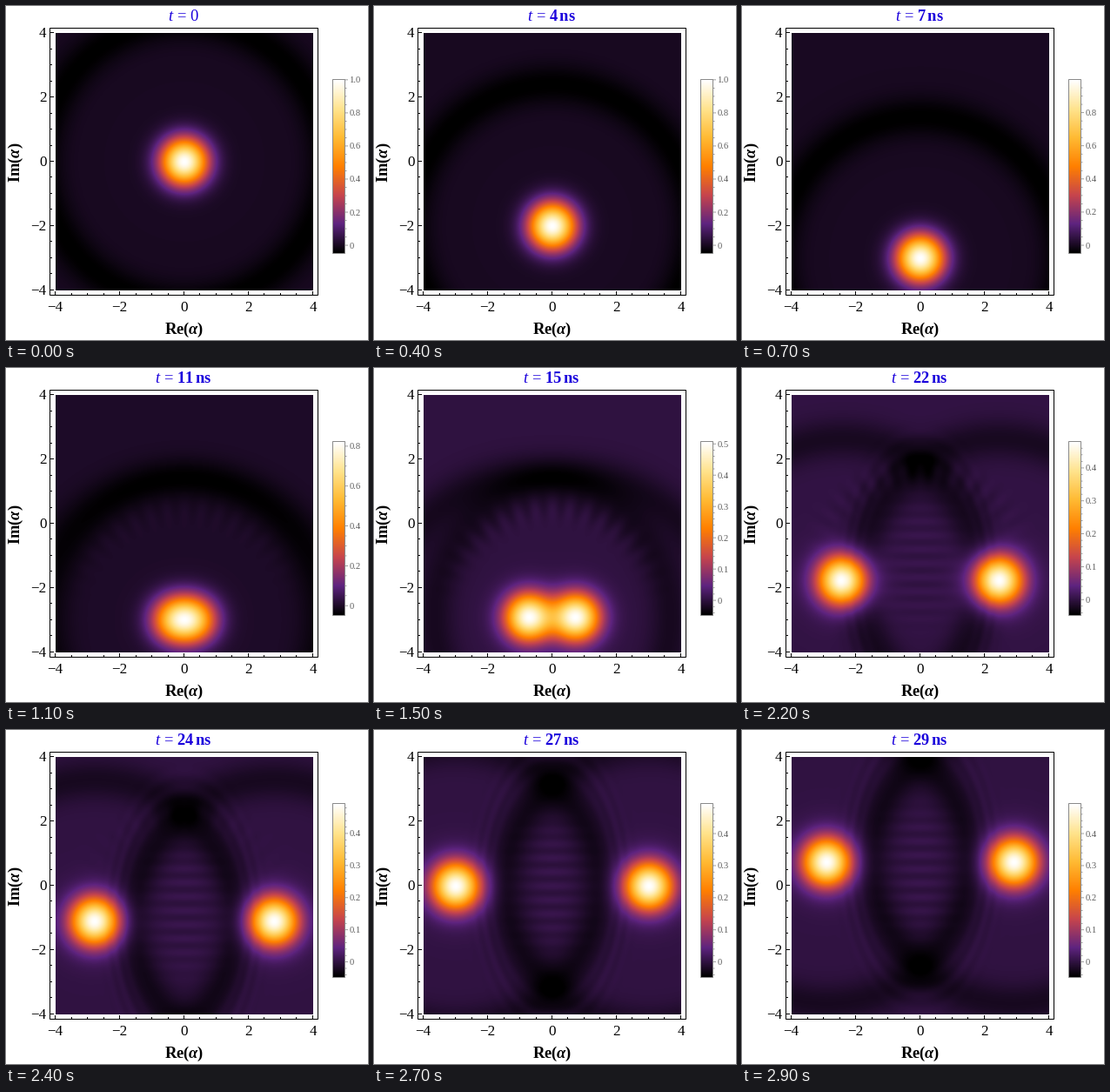
A matplotlib script that plays this animation: 416 px wide and 384 px high, repeating every 3000 ms.

```python
import numpy as np
import matplotlib.pyplot as plt
from matplotlib.animation import FuncAnimation
from matplotlib.colors import LinearSegmentedColormap
from matplotlib.patches import Rectangle

W, H, DPI = 416, 384, 64
PT = 72 / DPI                      # points per pixel
FRAMES, INTERVAL = 30, 100
LEFT, RIGHT, TOP, BOTTOM = 57, 353, 31, 327
BAR_L, BAR_R, BAR_T, BAR_B = 376, 389, 85, 284
VMIN = -0.047
BLUE, GREY = "#1a00dc", "#5a5a5a"

plt.rcParams.update({
    "font.family": "Liberation Serif",
    "mathtext.fontset": "custom",
    "mathtext.rm": "Liberation Serif",
    "mathtext.it": "Liberation Serif:italic",
    "mathtext.bf": "Liberation Serif:bold",
    "mathtext.bfit": "Liberation Serif:italic:bold",
})

SUNSET = LinearSegmentedColormap.from_list("sunset", [
    (0, 0, 0), (0.37, 0.14, 0.50), (0.78, 0.27, 0.30), (1, 0.5, 0),
    (1, 0.73, 0.20), (1, 0.89, 0.55), (1, 1, 1)], N=512)

N = RIGHT - LEFT
axis = (np.arange(N) + 0.5) / N * 8 - 4
X, Y = np.meshgrid(axis, -axis)


def smooth(a, b, t):
    u = np.clip((t - a) / (b - a), 0, 1)
    return u * u * (3 - 2 * u)


def split_angle(t):
    """Half angle between the two branches: the rate ramps up, then holds."""
    if t <= 6:
        return 0.0
    start, end, rate = 8, 20.88, 7.15
    if t < end:
        turn = rate * max(t - start, 0) ** 2 / (2 * (end - start))
    else:
        turn = rate * (t - (start + end) / 2)
    return np.radians(turn + 3.5 * np.exp(-((t - 11) / 3) ** 2))


def branch(cx, cy, spread):
    """Gaussian peak with a shallow negative ring around it."""
    r = np.hypot(X - cx, Y - cy)
    peak = (1 - 0.07 * spread) * np.exp(-2 * r**2)
    halo = 0.055 * spread * np.exp(-0.8 * r**2)
    ring = -0.048 * np.exp(-((r - 4.4) / 0.62) ** 2)
    return peak + halo + ring


def field(t):
    radius, angle = min(0.5 * t, 3), split_angle(t)
    bx, by = radius * np.sin(angle), -radius * np.cos(angle)
    spread = smooth(12, 20, t)
    w = (branch(bx, by, spread) + branch(-bx, by, spread)) / 2

    # radial ripples under the dark arc
    fan = 0.004 * smooth(7, 11, t) + 0.003 * smooth(12, 18, t)
    fan *= 1 - smooth(19, 26, t)
    r, phi = np.hypot(X, Y - by), np.arctan2(X, Y - by)
    w += fan * np.cos(40 * phi) * np.exp(-((r - 3.4) / 0.4) ** 2
                                         - (phi / 1.1) ** 4)

    # fringes between separated branches, inside a faint rippled oval
    cat = smooth(17, 24, t)
    y0 = 0.7 * by
    w += 0.006 * cat * (0.4 + np.cos(14.4 * (Y - y0))) * np.exp(
        -((X / 0.95) ** 2) - ((Y - y0) / 1.8) ** 4)
    q = np.hypot(X / 1.5, (Y - by) / 2.8)
    w -= 0.006 * cat * np.exp(-((q - 1) / 0.22) ** 2)
    w += 0.003 * cat * np.cos(30 * q) * np.exp(-((q - 1.45) / 0.25) ** 2)
    return w


fig = plt.figure(figsize=(W / DPI, H / DPI), dpi=DPI, facecolor="white")
ax = fig.add_axes([0, 0, 1, 1])
ax.axis("off")


def line(xs, ys, color="black", width=1):
    return ax.plot(xs, ys, color=color, lw=width * PT, snap=False,
                   solid_capstyle="butt")[0]


def label(x, y, s, size=17, **kw):
    kw = {"ha": "center", "va": "center_baseline", **kw}
    return ax.text(x, y, s, fontsize=size * PT, **kw)


def box(x0, y0, x1, y1, color):
    ax.add_patch(Rectangle((x0, y0), x1 - x0, y1 - y0, fill=False,
                           ec=color, lw=PT, joinstyle="miter", snap=False))


image = ax.imshow(np.zeros((N, N)), cmap=SUNSET, vmin=VMIN, vmax=1,
                  extent=(LEFT, RIGHT, BOTTOM, TOP), interpolation="nearest")
ax.imshow(np.linspace(1, 0, BAR_B - BAR_T)[:, None], cmap=SUNSET,
          extent=(BAR_L, BAR_R, BAR_B, BAR_T), interpolation="nearest")
ax.set(xlim=(0, W), ylim=(H, 0), aspect="auto")

box(50.5, 25.5, 358.5, 332.5, "black")
box(BAR_L - 0.5, BAR_T - 0.5, BAR_R + 0.5, BAR_B + 0.5, "#8a8a8a")

for k in range(-8, 9):
    offset = round(k * 18.45)
    px, py = 204.5 + offset, 178.5 - offset
    size = 2.5 if k % 4 else 4.5
    line([px, px], [332.5, 332.5 - size])
    line([50.5, 50.5 + size], [py, py])
    if k % 4 == 0:
        name = str(k // 2).replace("-", "\u2212")
        label(px, 345, name)
        label(46.5, py, name, ha="right")

label(204.5, 372, r"$\mathbf{Re(}\mathbfit{\alpha}\mathbf{)}$", 18.5,
      va="center")
label(11.5, 180, r"$\mathbf{Im(}\mathbfit{\alpha}\mathbf{)}$", 18.5,
      va="center", rotation=90)
title = label(204, 17, "", 18.5, color=BLUE, va="baseline")
scale = []


def draw_scale(vmax):
    while scale:
        scale.pop().remove()
    step, parts = (0.2, 4) if vmax > 0.65 else (0.1, 5)
    minor = step / parts
    # a tick may sit a hair above the sampled peak
    last = int(vmax / minor + 0.02)
    for k in range(int(np.ceil(VMIN / minor)), last + 1):
        value = k * minor
        y = BAR_B - (value - VMIN) / (vmax - VMIN) * (BAR_B - BAR_T)
        major = k % parts == 0
        scale.append(line([389.5, 393 if major else 391.5], [y, y],
                          "#8a8a8a", 0.8))
        if major:
            scale.append(label(394.5, y, f"{value:.1f}" if k else "0", 10.5,
                               ha="left", color=GREY))


def draw(t):
    w = field(t)
    vmax = w.max()
    image.set_data(w)
    image.set_clim(VMIN, vmax)
    if t:
        title.set_text(
            rf"$\mathit{{t}}\,=\,\mathbf{{{t}}}\,\mathbf{{ns}}$")
    else:
        title.set_text(r"$\mathit{t}\,=\,0$")
    draw_scale(vmax)
    return [image, title, *scale]


anim = FuncAnimation(fig, draw, frames=FRAMES, interval=INTERVAL,
                     init_func=lambda: draw(0), repeat=True, repeat_delay=0)
plt.show()
```
